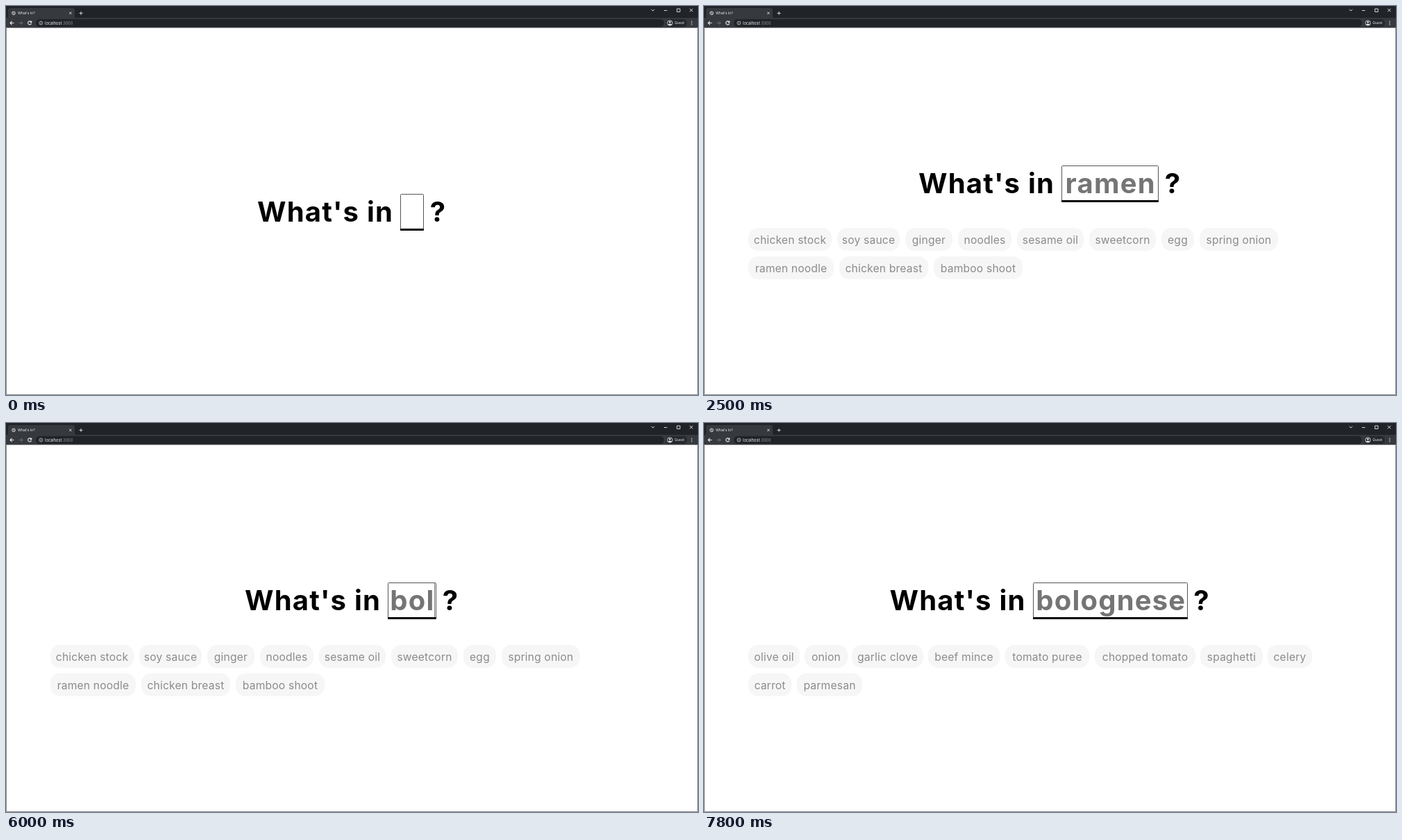
An HTML page that plays this animation: 997x561 px, repeating every 8 s.

```html
<!DOCTYPE html>
<html lang="en">
<head>
<meta charset="utf-8">
<title>What's In?</title>
<style>
  html, body { margin: 0; width: 100%; height: 100%; overflow: hidden; background: #fff; }
  svg { display: block; width: 100vw; height: 100vh; }
  text { font-family: Inter, "Open Sans", sans-serif; }
  .mid { text-anchor: middle; }
  .big { font-size: 40px; font-weight: 700; letter-spacing: 1.2px; }
  .chip { font-size: 15.6px; letter-spacing: .2px; fill: #8b8b8b; }
  .tiny { font-size: 5.4px; fill: #f1f3f4; }
  .icon { fill: none; stroke: #e8eaed; stroke-width: .9; }
</style>
</head>
<body>
<svg viewBox="0 0 997 561" preserveAspectRatio="none">
  <rect width="997" height="561" fill="#fff"/>

  <g id="browser">
    <rect width="997" height="18" fill="#202428"/>
    <rect y="17" width="997" height="14.5" fill="#36393d"/>
    <path d="M0 17.5q3 0 3-3V6q0-3 3-3H96q3 0 3 3v8.500q0 3 3 3z" fill="#36393d"/>
    <rect x="43" y="19" width="905" height="11" rx="5.500" fill="#202428"/>
    <rect x="951" y="19" width="30" height="11" rx="5.500" fill="#25282c"/>
    <g class="icon">
      <circle cx="11" cy="10.300" r="2.300"/>
      <path d="M9.500 9l3 2.600" />
      <path d="M91.200 8.700l3.200 3.200m0-3.200l-3.200 3.200M105.500 10.400h5M108 7.900v5"/>
      <path d="M929.700 4.800l2.300 2.300 2.300-2.300M948 6.500h4.500M966.700 4h4.400v4.400h-4.400zM985 3.800l4.500 4.500m0-4.500l-4.500 4.500"/>
      <path d="M11.500 24.500H6m2.600-2.600L6 24.500l2.600 2.600" stroke-width="1.100"/>
      <path d="M18.500 24.500H24m-2.600-2.600l2.600 2.600-2.600 2.600" stroke="#777b80"/>
      <path d="M36.200 23A2.500 2.500 0 1 0 36.500 25.200M36.700 21.600v2h-2" stroke-width="1.100"/>
      <circle cx="50.300" cy="24.500" r="2.500" stroke-width=".7"/>
      <path d="M50.300 24.200v1.700m0-3v.7" stroke-width=".7"/>
      <circle cx="956.500" cy="24.500" r="3.700"/>
    </g>
    <g fill="#e8eaed">
      <circle cx="956.500" cy="23.300" r="1.300"/>
      <path d="M954 26.800q2.500-2.600 5 0-2.500 2-5 0z"/>
      <circle cx="988" cy="22.200" r=".7"/>
      <circle cx="988" cy="24.500" r=".7"/>
      <circle cx="988" cy="26.800" r=".7"/>
    </g>
    <text class="tiny" x="17" y="12.200" style="font-size:5px">What's In?</text>
    <text class="tiny" x="56" y="26.500" style="font-size:5.700px">localhost<tspan fill="#8f9499">:3000</tspan></text>
    <text class="tiny" x="963.300" y="26.400" style="font-size:5px">Guest</text>
    <path d="M.5 31.500V560.500H996.500V31.500" fill="none" stroke="#85888b" stroke-width="1"/>
  </g>

  <g id="heading">
    <g id="before" class="big mid">
      <text x="435.500" y="310.500">What's</text>
      <text x="539" y="310.500">in</text>
    </g>
    <rect id="mark" y="272" height="49" fill="#3399ff"/>
    <text id="word" class="big mid" y="310.500"></text>
    <rect id="frame" y="271.500" height="51" rx="1" fill="none" stroke="#555"/>
    <rect id="line" y="321" height="3" rx=".8"/>
    <rect id="caret" y="272" width="1" height="49" fill="#757575"/>
    <text id="after" class="big mid" x="622.500" y="310.500">?</text>
  </g>
  <g id="ramen"></g>
  <g id="bolognese"></g>
</svg>

<script>
const LOOP = 8000;
const $ = id => document.getElementById(id);

// Chip rows: [label, left, right]
const chips = {
  ramen: [
    [["chicken stock", 64, 184], ["soy sauce", 192, 282], ["ginger", 290, 358],
     ["noodles", 366, 443], ["sesame oil", 451, 547], ["sweetcorn", 555, 651],
     ["egg", 659, 706], ["spring onion", 714, 827]],
    [["ramen noodle", 64, 187], ["chicken breast", 195, 323], ["bamboo shoot", 331, 459]]
  ],
  bolognese: [
    [["olive oil", 64, 138], ["onion", 145, 207], ["garlic clove", 213, 316],
     ["beef mince", 323, 426], ["tomato puree", 434, 555], ["chopped tomato", 563, 708],
     ["spaghetti", 715, 805], ["celery", 812, 876]],
    [["carrot", 64, 126], ["parmesan", 134, 228]]
  ]
};

const typing = [
  [0, ""], [1400, "r"], [1500, "ra"], [1700, "ram"], [1800, "rame"], [1900, "ramen"],
  [5200, "b"], [5600, "bo"], [6000, "bol"], [6100, "bolo"], [6200, "bolog"],
  [6400, "bologn"], [6900, "bologne"], [7100, "bolognes"], [7300, "bolognese"]
];
const blinks = [
  [0, 0], [300, 1], [900, 0], [1400, 1], [2400, 0], [2900, 1], [3400, 0],
  [4000, 1], [4400, 0], [5200, 1], [7800, 0]
];
const lists = [[0, ""], [2400, "ramen"], [7600, "bolognese"]];
const selected = [[0, 0], [4400, 1], [5200, 0]];

// Letter advances in thousandths of an em
const advance = { a: 605, b: 685, e: 631, g: 695, l: 293, m: 1039, n: 666, o: 649, r: 417, s: 500 };
const textWidth = s => [...s].reduce((sum, c) => sum + advance[c], 0) * 0.0408;

const at = (steps, t) => steps.findLast(step => step[0] <= t)[1];
const set = (id, name, value) => $(id).setAttribute(name, value);
const show = (id, on) => set(id, "visibility", on ? "visible" : "hidden");

function add(parent, tag, attrs, label = "") {
  const el = document.createElementNS("http://www.w3.org/2000/svg", tag);
  for (const name in attrs) el.setAttribute(name, attrs[name]);
  el.textContent = label;
  parent.append(el);
}

for (const id in chips) {
  chips[id].forEach((row, i) => {
    const y = 320 + i * 41;
    for (const [label, left, right] of row) {
      add($(id), "rect", { x: left, y, width: right - left, height: 33, rx: 14, fill: "#f6f6f6" });
      add($(id), "text", { class: "chip mid", x: (left + right) / 2, y: y + 22.5 }, label);
    }
  });
}

function draw(t) {
  const word = at(typing, t);
  const list = at(lists, t);
  const marked = at(selected, t);
  const inner = textWidth(word);
  const width = Math.max(33, Math.round(inner + 2.2));
  const left = Math.floor(585 - width / 2);
  const grow = (width - 33) / 2;

  set("heading", "transform", `translate(0 ${list ? -41 : 0})`);
  set("before", "transform", `translate(${-grow} 0)`);
  set("after", "transform", `translate(${grow} 0)`);

  $("word").textContent = word;
  set("word", "x", left + 2.2 + inner / 2);
  set("word", "fill", marked ? "#fff" : "#757575");
  set("frame", "x", left + 0.5);
  set("frame", "width", width);
  set("line", "x", left);
  set("line", "width", width + 1);
  set("mark", "x", left + 1);
  set("mark", "width", width - 2);
  set("caret", "x", Math.floor(left + 1.4 + inner));

  show("mark", marked);
  show("caret", at(blinks, t));
  for (const id in chips) show(id, id === list);
}

const start = performance.now();
function tick() {
  draw((performance.now() - start) % LOOP);
  requestAnimationFrame(tick);
}
tick();
</script>
</body>
</html>
```
